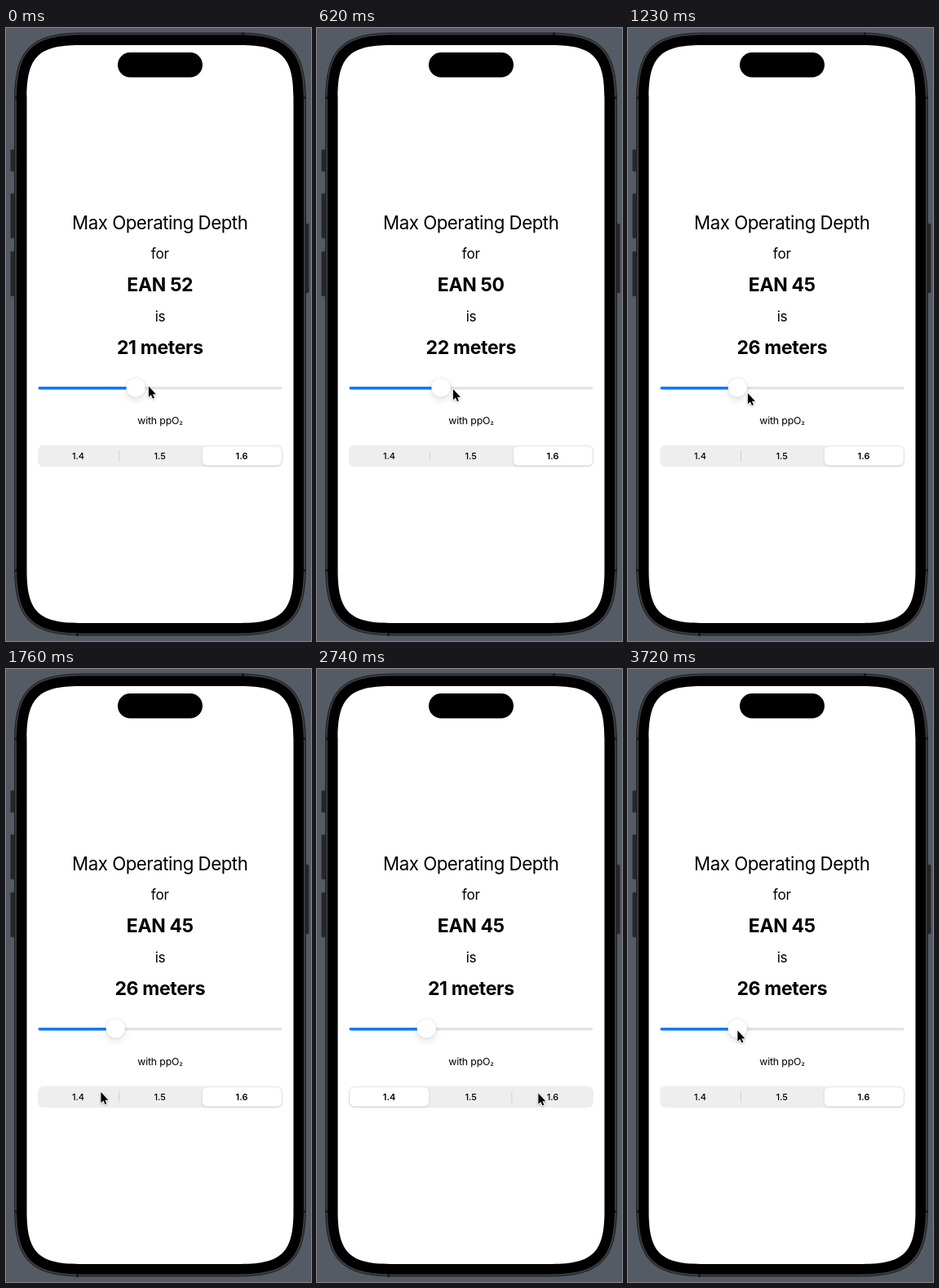
Write an HTML page that moves like this. It is 374 px wide and 752 px high and loops after 4.89 s.

```html
<!DOCTYPE html>
<html lang="en">
<head>
<meta charset="utf-8">
<title>Max Operating Depth</title>
<style>
  html, body { margin: 0; width: 100%; height: 100%; overflow: hidden; background: #555b65; }
  svg { display: block; width: 374px; height: 752px; }
  text { font-family: Inter, "Open Sans", sans-serif; text-anchor: middle; fill: #000; }
  .title { font-size: 22.3px; letter-spacing: -.5px; }
  .word { font-size: 17.2px; letter-spacing: -.3px; }
  .value { font-size: 23px; font-weight: 700; letter-spacing: -.32px; }
  .note { font-size: 12.3px; letter-spacing: -.15px; }
  .label { font-size: 11px; font-weight: 500; }
  .label.on { font-weight: 600; }
  #knob { filter: drop-shadow(0 .5px 1.5px rgba(0,0,0,.14)) drop-shadow(0 4px 4px rgba(0,0,0,.1)); }
  #pill { filter: drop-shadow(0 1px 1.5px rgba(0,0,0,.14)); }
  #cursor { filter: drop-shadow(0 1px 1px rgba(0,0,0,.25)); }
</style>
</head>
<body>
<svg viewBox="0 0 374 752">
  <rect width="374" height="752" fill="#555b65"/>

  <g fill="#26272a" stroke="#3c3e42" stroke-width=".6">
    <rect x="5.5" y="149" width="7" height="27" rx="1.5"/>
    <rect x="5.5" y="203" width="7" height="55" rx="1.5"/>
    <rect x="5.5" y="274" width="7" height="55" rx="1.5"/>
    <rect x="365" y="240" width="6.5" height="85" rx="1.5"/>
  </g>
  <path id="rim" fill="#3a3b3d" stroke="#1d1e20"/>
  <path d="M10 85.5h4M364 85.5h4M10 665.5h4M364 665.5h4M290.5 5.5v4M87.5 742v4" stroke="#1a1a1c" stroke-width="3"/>
  <path id="bezel"/>
  <path id="screen" fill="#fff"/>
  <rect x="137" y="30" width="104" height="30.5" rx="15.25"/>

  <text class="title" x="188.7" y="246.5">Max Operating Depth</text>
  <text class="word" x="188.7" y="283">for</text>
  <text class="value" id="mix" x="188.8" y="323.3"></text>
  <text class="word" x="189" y="359.5">is</text>
  <text class="value" id="depth" x="188.8" y="399.8"></text>

  <rect x="39.5" y="440" width="299" height="3.4" rx="1.7" fill="#e4e4e6"/>
  <rect id="fill" x="39.5" y="440" height="3.4" rx="1.7" fill="#007aff"/>
  <circle id="knob" cy="441" r="11.6" fill="#fff"/>

  <text class="note" x="189" y="486">with ppO<tspan font-size="10.5" dy="-.7">₂</tspan></text>

  <rect x="39" y="511.7" width="300" height="26.6" rx="7" fill="#eeeeef"/>
  <path class="divider" d="M138.5 518v14" stroke="#d3d3d6"/>
  <path class="divider" d="M238.9 518v14" stroke="#d3d3d6"/>
  <rect id="pill" y="513.2" width="97" height="23.4" rx="5.8" fill="#fff"/>
  <text class="label" x="88.5" y="529">1.4</text>
  <text class="label" x="188.7" y="529">1.5</text>
  <text class="label" x="289" y="529">1.6</text>

  <path id="cursor" d="M0 0V13.2L3 10.4L5 15L7 14.1L5.1 9.6H9Z" stroke="#fff" stroke-width="1.6" stroke-linejoin="round" paint-order="stroke"/>
</svg>

<script>
  const LOOP = 4890, TICK = 88.3, LEAD = 14;   // ms; the picture advances in ticks
  const TO_LOW = 23, TO_HIGH = 34;             // ticks at which a segment is tapped

  // Pointer strokes: start tick, end tick, dx, dy
  const strokes = [
    [0, 6, -8, 3.5], [7, 10, 66, -3.5], [10, 13, -86, 8.5],     // drag the knob
    [15, 20, -30.5, 71],                                        // to 1.4
    [25, 28, 149, -3.5], [28, 31, 6, 5],                        // to 1.6
    [36, 39, -130.5, -73.5], [39, 42, -6.5, -3.5]               // back to the knob
  ];

  const $ = id => document.getElementById(id);
  const mix = $("mix"), depth = $("depth"), fill = $("fill"), knob = $("knob"),
    pill = $("pill"), cursor = $("cursor");
  const labels = document.querySelectorAll(".label");
  const dividers = document.querySelectorAll(".divider");

  // Rectangle with continuous-curvature corners
  function squircle(x, y, w, h, r) {
    const e = 1.4 * r, d = e - .315 * r;
    return `M${x + e} ${y}h${w - 2 * e}c${d} 0 ${e} ${e - d} ${e} ${e}` +
      `v${h - 2 * e}c0 ${d} ${d - e} ${e} ${-e} ${e}` +
      `h${2 * e - w}c${-d} 0 ${-e} ${d - e} ${-e} ${-e}` +
      `v${2 * e - h}c0 ${-d} ${e - d} ${-e} ${e} ${-e}z`;
  }

  function outline(id, inset) {
    $(id).setAttribute("d", squircle(10.5 + inset, 6 + inset, 357 - 2 * inset, 739 - 2 * inset, 61 - inset));
  }
  outline("rim", 0);
  outline("bezel", 2.5);
  outline("screen", 15);

  // Smooth step from 0 to 1 between ticks a and b
  function ramp(n, a, b) {
    const k = Math.min(1, Math.max(0, (n - a) / (b - a)));
    return k * k * (3 - 2 * k);
  }

  // Critically damped spring, 0 to 1
  function spring(ticks) {
    if (ticks < 0) return 0;
    const x = 1.75 * (ticks + .6);
    return 1 - (1 + x) * Math.exp(-x);
  }

  function draw(n) {
    const percent = 52 - 2 * ramp(n, 0, 6) + 22 * ramp(n, 7, 11) - 27 * ramp(n, 11, 13.6);
    const ean = Math.round(percent);
    const pressure = n >= TO_LOW && n < TO_HIGH ? 1.4 : 1.6;
    const low = spring(n - TO_LOW) - spring(n - TO_HIGH);
    const x = 152 + (percent - 50) * 3.55;

    mix.textContent = `EAN ${ean}`;
    depth.textContent = `${Math.round((pressure * 100 / ean - 1) * 10)} meters`;
    fill.setAttribute("width", x - 39.5);
    knob.setAttribute("cx", x);
    pill.setAttribute("x", 240.9 - 200.9 * low);
    dividers[0].style.opacity = 1 - low;
    dividers[1].style.opacity = low;
    labels[0].classList.toggle("on", low > .5);
    labels[2].classList.toggle("on", low <= .5);

    let px = 174.9, py = 439.6;
    for (const [a, b, dx, dy] of strokes) {
      const k = ramp(n, a, b);
      px += dx * k;
      py += dy * k;
    }
    cursor.setAttribute("transform", `translate(${px} ${py})`);
  }

  const start = performance.now();
  function frame() {
    const t = (performance.now() - start) % LOOP;
    draw(Math.floor((t + LEAD) / TICK));
    requestAnimationFrame(frame);
  }
  frame();
</script>
</body>
</html>
```
